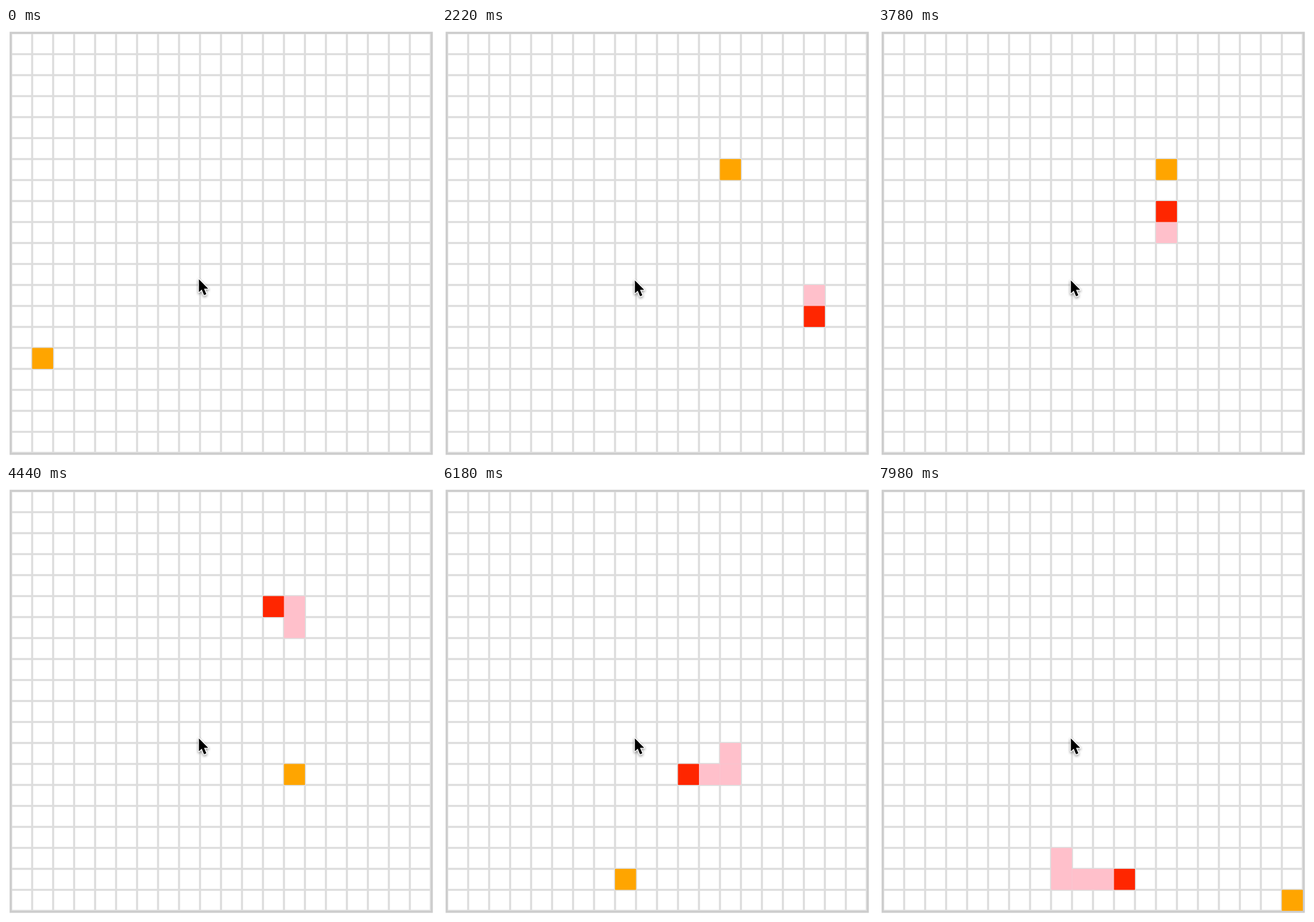
These frames come from a looping animation (748x748 px, 8 s). An HTML page with a canvas:

```html
<!DOCTYPE html>
<html>
<head>
<meta charset="utf-8">
<style>
  html, body { margin: 0; width: 100%; height: 100%; overflow: hidden; background: #fff; }
  canvas { display: block; }
</style>
</head>
<body>
<canvas id="stage" width="748" height="748"></canvas>
<script>
const ctx = document.getElementById('stage').getContext('2d');
const LOOP = 8000, CELLS = 20, SIZE = 36.5, ORIGIN = 9;
const STEPS = { R: [1, 0], L: [-1, 0], U: [0, -1], D: [0, 1] };
const ROUTE = 'R7 D3 L4 U8 L1 R1 D8 L5 D5 R3';
const FOODS = [[17, 11], [13, 6], [13, 13], [8, 18], [19, 19]];
const IDLE_FOOD = [1, 15];

// Every head position, starting with a one-tick pause in the middle.
const trail = [[10, 10], [10, 10]];
for (const [dir, ...count] of ROUTE.split(' ')) {
  const [dx, dy] = STEPS[dir];
  for (let i = 0; i < +count.join(''); i++) {
    const [x, y] = trail[trail.length - 1];
    trail.push([x + dx, y + dy]);
  }
}

// The tenth tick comes slightly late.
const tickTime = k => 270 + 166 * k + (k > 9 ? 62 : 0);
const same = (a, b) => a[0] === b[0] && a[1] === b[1];

function fillCell([x, y], color) {
  ctx.fillStyle = color;
  ctx.fillRect(ORIGIN + x * SIZE, ORIGIN + y * SIZE, SIZE, SIZE);
}

function drawGrid() {
  ctx.fillStyle = '#fff';
  ctx.fillRect(0, 0, 748, 748);
  ctx.strokeStyle = '#ddd';
  ctx.lineWidth = 3.6;
  for (let i = 0; i <= CELLS; i++) {
    const p = ORIGIN + i * SIZE, end = ORIGIN + CELLS * SIZE;
    ctx.beginPath();
    ctx.moveTo(p, ORIGIN);
    ctx.lineTo(p, end);
    ctx.moveTo(ORIGIN, p);
    ctx.lineTo(end, p);
    ctx.stroke();
  }
  ctx.strokeStyle = '#ccc';
  ctx.lineWidth = 3.4;
  ctx.strokeRect(8, 8.3, 732.8, 732.5);
}

const arrow = new Path2D('M0 0V22.5L5 18L9 27.8L13 26.1L9 16.6H16.2Z');

function drawCursor(x, y) {
  ctx.save();
  ctx.translate(x, y);
  ctx.lineWidth = 3;
  ctx.lineJoin = 'round';
  ctx.strokeStyle = '#fff';
  ctx.shadowColor = 'rgba(0,0,0,.45)';
  ctx.shadowBlur = 4;
  ctx.shadowOffsetY = 2;
  ctx.stroke(arrow);
  ctx.shadowColor = 'transparent';
  ctx.fillStyle = '#000';
  ctx.fill(arrow);
  ctx.restore();
}

function draw(t) {
  let tick = -1;
  while (tick + 1 < trail.length && tickTime(tick + 1) <= t) tick++;
  drawGrid();
  if (tick < 0) {
    fillCell(IDLE_FOOD, 'orange');
  } else {
    let eaten = 0;
    for (let i = 0; i <= tick; i++) if (same(trail[i], FOODS[eaten])) eaten++;
    fillCell(FOODS[eaten], 'orange');
    for (let i = eaten; i > 0; i--) fillCell(trail[tick - i], 'pink');
    fillCell(trail[tick], '#ff2600');
  }
  drawCursor(335.5, tick < 0 ? 437 : 439);
}

function frame() {
  draw(performance.now() % LOOP);
  requestAnimationFrame(frame);
}
frame();
</script>
</body>
</html>
```
